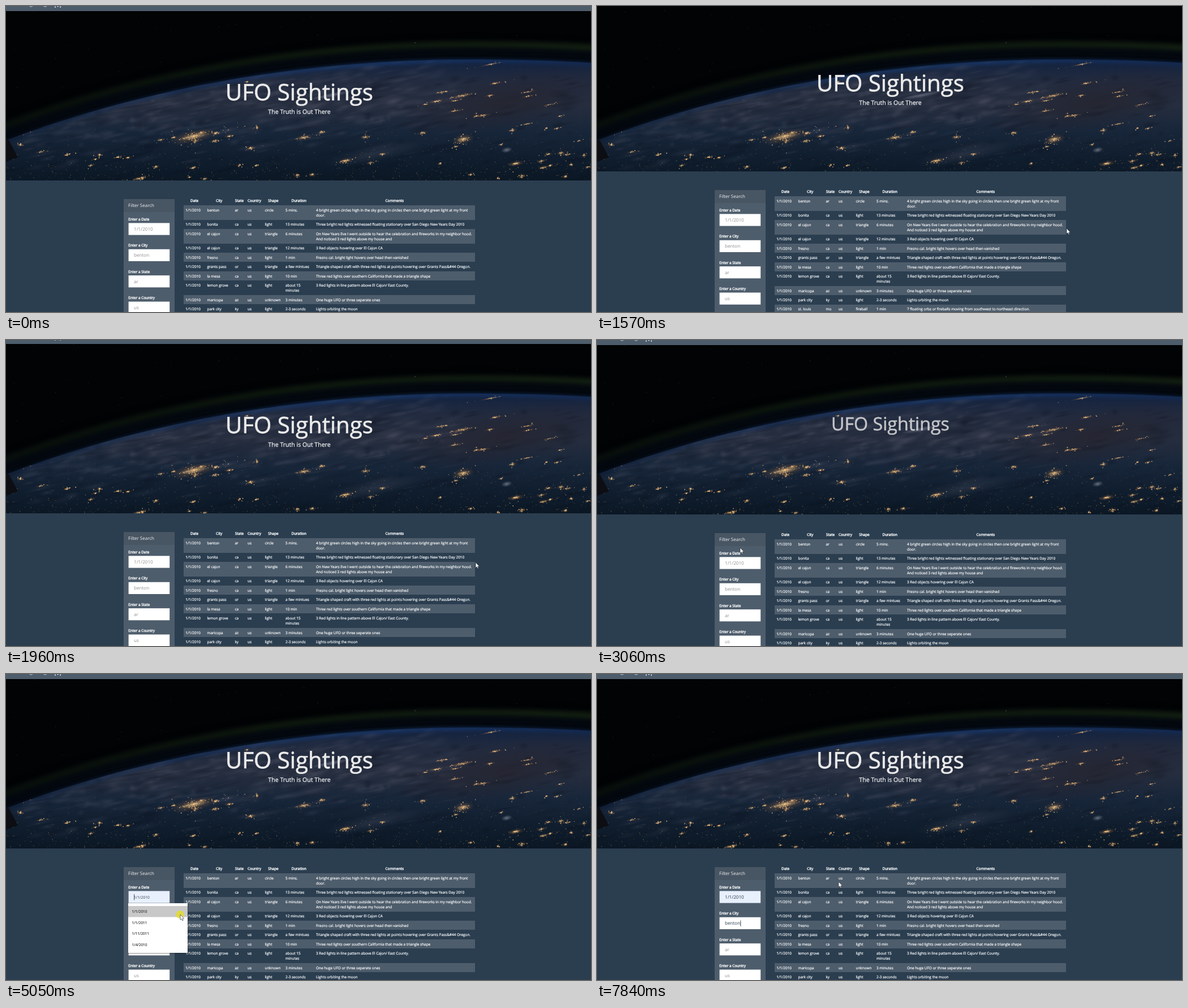
Recreate the animation shown at these times as an HTML page with a canvas. Size 1034 by 542 pixels, loop 8000 ms.

```html
<!DOCTYPE html>
<html lang="en">
<head>
<meta charset="utf-8">
<title>UFO Sightings</title>
<style>
  html, body { margin: 0; width: 100%; height: 100%; overflow: hidden; background: #2b3e50; }
  canvas, svg { position: absolute; left: 0; top: 0; display: block; }
  text {
    font-family: "Open Sans", "Noto Sans", sans-serif;
    font-size: 6.41px; fill: #f1f3f4; white-space: pre;
    text-rendering: geometricPrecision;
  }
  .cell { stroke: #f1f3f4; stroke-width: .24px; }
  .bold { stroke: #f1f3f4; stroke-width: .42px; }
  .field { font-size: 8.1px; fill: #8f8f8f; }
  .item { fill: #222; stroke: #222; stroke-width: .12px; }
  .brand { font-size: 10.5px; }
  .heading { font-size: 8px; }
  .title { font-size: 40.2px; fill: #ebebeb; stroke: #ebebeb; stroke-width: .7px; }
  .subtitle { font-size: 10.6px; stroke: #f1f3f4; stroke-width: .25px; }
</style>
</head>
<body>
<canvas id="photo" width="1034" height="542"></canvas>
<svg id="stage" width="1034" height="542" viewBox="0 0 1034 542"></svg>
<script>
const LOOP = 8000;

// ---------- night view of the planet, drawn once ----------
function paintPhoto() {
  const c = document.getElementById('photo').getContext('2d');
  let seed = 11;
  const rnd = () => (seed = (seed * 16807) % 2147483647) / 2147483647;
  const range = (a, b) => a + rnd() * (b - a);
  const gauss = () => (rnd() + rnd() + rnd() - 1.5) * 1.4;
  const repeat = (n, draw) => { for (let i = 0; i < n; i++) draw(i); };

  const gradient = (x, y, colors) => {
    const g = c.createLinearGradient(0, y ? 90 : 0, x, y);
    colors.forEach((col, i) => g.addColorStop(i / (colors.length - 1), col));
    return g;
  };
  const limb = dy => {
    c.beginPath();
    c.moveTo(-20, 246 + dy);
    c.bezierCurveTo(250, 140 + dy, 550, 92 + dy, 850, 95 + dy);
    c.bezierCurveTo(920, 95.5 + dy, 980, 97 + dy, 1054, 102 + dy);
  };
  const glow = (dy, width, blur, style) => {
    c.filter = `blur(${blur}px)`;
    c.lineWidth = width;
    c.strokeStyle = style;
    limb(dy);
    c.stroke();
    c.filter = 'none';
  };
  const dot = (x, y, r, fill) => {
    c.fillStyle = fill;
    c.beginPath();
    c.arc(x, y, r, 0, 7);
    c.fill();
  };
  const blob = (x, y, rx, ry, rgb, a) => {
    c.save();
    c.translate(x, y);
    c.rotate(-0.2);
    c.scale(rx, ry);
    const g = c.createRadialGradient(0, 0, 0, 0, 0, 1);
    g.addColorStop(0, `rgba(${rgb},${a})`);
    g.addColorStop(1, `rgba(${rgb},0)`);
    dot(0, 0, 1, g);
    c.restore();
  };
  // dense in the middle, thinning out along a slight slope
  const city = (x, y, w, h) => {
    blob(x, y, w * 1.2, h * 1.3, '205,130,62', 0.35);
    blob(x, y, w * 0.7, h * 0.6, '255,215,150', 0.6);
    repeat(8 + w * h * 0.3, () => {
      const dx = gauss() * Math.abs(gauss()) * w * 1.4;
      const dy = gauss() * Math.abs(gauss()) * h * 1.4;
      dot(x + dx, y + dy - dx * 0.18, range(0.4, 1), `rgba(255,205,140,${range(0.35, 0.9)})`);
    });
  };

  c.fillStyle = '#020304';
  c.fillRect(0, 0, 1034, 542);
  repeat(90, () => dot(range(0, 1034), range(0, 200), 0.45, `rgba(200,210,225,${range(0.1, 0.5)})`));
  dot(723, 65, 0.8, '#b9c2cc');
  glow(-14, 26, 9, '#040911');
  glow(-27, 8, 4, gradient(1034, 0, ['#0a130b', '#121f0f', '#182713']));

  c.save();
  limb(0);
  c.lineTo(1054, 542);
  c.lineTo(-20, 542);
  c.clip();
  c.fillStyle = gradient(0, 309, ['#11213f', '#222b3f', '#252d3e', '#18263a', '#101e2f', '#0b1724']);
  c.fillRect(0, 0, 1034, 542);

  repeat(480, () => {
    const x = range(20, 800);
    blob(x, 205 - x * 0.06 + gauss() * 52, range(6, 34), range(2, 8), '116,114,130', range(0.05, 0.16));
  });
  repeat(220, () => blob(range(0, 1034), range(125, 309), range(6, 38), range(2, 8), '9,15,27', range(0.12, 0.32)));
  blob(880, 170, 190, 50, '38,31,38', 0.5);
  blob(650, 262, 90, 14, '110,112,128', 0.22);
  blob(575, 158, 40, 4, '185,190,205', 0.35);
  blob(885, 255, 10, 5, '180,185,195', 0.5);

  repeat(1100, () => {
    const depth = Math.sqrt(rnd());
    dot(range(0, 1034), 170 + depth * 139, range(0.3, 0.8), `rgba(235,178,112,${range(0.1, 0.6) * depth})`);
  });
  repeat(55, () => {
    const y = range(215, 307);
    city(range(0, 1034), y, range(3, 9), range(1.2, 3.5));
  });
  repeat(14, () => city(range(700, 1034), range(135, 215), range(6, 14), range(1, 2)));
  [[332, 231, 36, 9], [808, 236, 17, 7], [526, 233, 14, 4], [601, 274, 11, 4], [901, 279, 13, 4], [858, 103, 20, 1.5], [806, 159, 18, 3], [426, 134, 4, 2]]
    .forEach(place => city(...place));
  c.restore();

  glow(2, 4, 3, gradient(1034, 0, ['#0a1a34', '#15356a', '#19407c', '#122e5e']));
  c.fillStyle = '#0c0e13';
  c.beginPath();
  [[0, 236], [5, 238], [21, 268], [0, 276]].forEach(([x, y]) => c.lineTo(x, y));
  c.fill();
}

// ---------- page ----------
const rect = (x, y, w, h, fill, extra = '') =>
  `<rect x="${x}" y="${y}" width="${w}" height="${h}" fill="${fill}" ${extra}/>`;
const text = (x, y, str, cls = '', extra = '') =>
  `<text x="${x}" y="${y}" class="${cls}" ${extra}>${str.replace(/&/g, '&amp;')}</text>`;
const MIDDLE = 'text-anchor="middle"';

const HEADERS = ['Date', 'City', 'State', 'Country', 'Shape', 'Duration', 'Comments'];
const EDGES = [314, 352.2, 401.2, 423.7, 454.2, 490.7, 544.7, 829];
// city, state, shape, duration, comment; "|" breaks a line
const SIGHTINGS = [
  ['benton', 'ar', 'circle', '5 mins.', '4 bright green circles high in the sky going in circles then one bright green light at my front|door.'],
  ['bonita', 'ca', 'light', '13 minutes', 'Three bright red lights witnessed floating stationary over San Diego New Years Day 2010'],
  ['el cajon', 'ca', 'triangle', '6 minutes', 'On New Years Eve I went outside to hear the celebration and fireworks in my neighbor hood.|And noticed 3 red lights above my house and'],
  ['el cajon', 'ca', 'triangle', '12 minutes', '3 Red objects hovering over El Cajon CA'],
  ['fresno', 'ca', 'light', '1 min', 'Fresno cal. bright light hovers over head then vanished'],
  ['grants pass', 'or', 'triangle', 'a few mintues', 'Triangle shaped craft with three red lights at points hovering over Grants Pass&#44 Oregon.'],
  ['la mesa', 'ca', 'light', '10 min', 'Three red lights over southern California that made a triangle shape'],
  ['lemon grove', 'ca', 'light', 'about 15|minutes', '3 Red lights in line pattern above El Cajon/ East County.'],
  ['maricopa', 'az', 'unknown', '3 minutes', 'One huge UFO or three seperate ones'],
  ['park city', 'ky', 'light', '2-3 seconds', 'Lights orbiting the moon'],
  ['st. louis', 'mo', 'fireball', '1 min', '7 floating orbs or fireballs moving from southwest to northeast direction.'],
  ['el cajon', 'ca', 'formation', '15 min.', 'Three red lights over the San Diego area - IT&#39S A HOAX YET AGAIN&#33&#33'],
  ['spring valley', 'ca', 'light', '10:00', 'Three bright red lights in a straight line formation']
];
const FILTERS = [['Date', '1/1/2010'], ['City', 'benton'], ['State', 'ar'], ['Country', 'us'], ['Shape', 'circle']];

function table() {
  let out = HEADERS.map((name, k) => text((EDGES[k] + EDGES[k + 1]) / 2, 346.8, name, 'bold', MIDDLE)).join('');
  let y = 353;
  SIGHTINGS.forEach(([city, state, shape, duration, comment], i) => {
    const cells = ['1/1/2010', city, state, 'us', shape, duration, comment];
    const h = cells.some(s => s.includes('|')) ? 25.6 : 16.4;
    const top = Math.round(y);
    if (i % 2 === 0) out += rect(314, top, 515, Math.round(y + h) - top, '#4e5d6c');
    cells.forEach((cell, k) => cell.split('|').forEach((line, n) => {
      out += text(EDGES[k] + 3.3, y + 10.7 + n * 9.2, line, 'cell');
    }));
    y += h;
  });
  return out;
}

function filterPanel() {
  return rect(208, 342, 90, 300, '#4e5d6c') + rect(208, 342, 90, 23, '#485563') +
    text(216, 356, 'Filter Search', 'heading') +
    FILTERS.map(([name, hint], i) => {
      const y = 46.4 * i;
      return text(216.3, 379.7 + y, 'Enter a ' + name, 'bold') +
        rect(216.6, 384.4 + y, 72.6, 21.2, '#fff', `id="box${i}"`) +
        text(226, 398 + y, hint, 'field', `id="field${i}"`);
    }).join('');
}

function menu(id, top, items) {
  const h = items.length * 19.6 + 9.5;
  return `<g id="${id}">` + rect(216, top + 1, 106, h + 1, '#000', 'opacity=".25"') +
    rect(216, top, 105, h, '#fff') +
    rect(216, top + 5, 105, 19.5, '#c8c8c8', `id="${id}Hover" visibility="hidden"`) +
    items.map((s, i) => text(222.7, top + 17 + i * 19.6, s, 'item')).join('') + '</g>';
}

paintPhoto();
document.getElementById('stage').innerHTML =
  '<g id="page">' +
  rect(0, -60, 1034, 69, '#4e5d6c') +
  text(9, -0.9, 'UFO Sightings', 'brand') +
  [-1, 0, 1].map(k => `<circle cx="${91.6 + k * 4.6}" cy="${0.6 + 1.2 * k * k}" r="1" fill="#fff"/>`).join('') +
  rect(0, 309, 1034, 400, '#2b3e50') +
  `<g id="title">${text(518.5, 167, 'UFO Sightings', 'title', MIDDLE)}</g>` +
  text(518.5, 191.4, 'The Truth is Out There', 'subtitle', MIDDLE + ' id="subtitle"') +
  filterPanel() + table() +
  rect(226, 390, 0.8, 10.5, '#222', 'id="caret"') +
  menu('dates', 406, ['1/1/2010', '1/1/2011', '1/11/2011', '1/4/2010']) +
  menu('cities', 452, ['benton', 'el cajon', 'fresno']) +
  menu('match', 452, ['benton']) +
  '</g>' +
  '<circle id="click" r="7" fill="#e3dc2c" opacity=".85"/>' +
  '<path id="cursor" d="M0 0V9.6L2.2 7.6L3.7 11L5.2 10.3L3.8 7.1H6.7Z" fill="#fff" stroke="#1c2430" stroke-width=".6"/>';

const el = {};
document.querySelectorAll('[id]').forEach(node => { el[node.id] = node; });

// ---------- motion ----------
// start, end, x, y of each pointer move
const MOVES = [
  [300, 860, 912, 441], [940, 1400, 830, 394], [2150, 2980, 253, 368], [3060, 3380, 249, 387],
  [4500, 4680, 348, 368], [4680, 4900, 308, 426], [5780, 6020, 283, 439], [6200, 6510, 427, 368]
];
const CLICKS = [3520, 5010, 6060];
const KEYS = [6670, 6900, 7450, 7600, 7770, 7840];

const between = (t, a, b) => t >= a && t < b;
const progress = (t, a, b) => Math.max(0, Math.min(1, (t - a) / (b - a)));
const easeOut = p => Math.sin(p * Math.PI / 2);
const smooth = p => p * p * (3 - 2 * p);
const show = (node, on) => node.setAttribute('visibility', on ? 'visible' : 'hidden');

const scrollAt = t => 53 * easeOut(progress(t, 1514, 1800)) * (1 - progress(t, 1850, 2016)) ** 3;

const pointerAt = t => MOVES.reduce(([x, y], [a, b, toX, toY]) => {
  const p = smooth(progress(t, a, b));
  return [x + (toX - x) * p, y + (toY - y) * p];
}, [1040, 555]);

function setField(i, value, color, size, box) {
  const f = el['field' + i];
  if (f.textContent !== value) f.textContent = value;
  f.style.fill = color;
  f.style.fontSize = size + 'px';
  el['box' + i].setAttribute('fill', box);
}

function render(t) {
  el.page.setAttribute('transform', `translate(0 ${-Math.round(scrollAt(t))})`);

  const grow = t < 2600 ? 1 : easeOut(progress(t, 2600, 3380));
  el.title.setAttribute('transform', `translate(518.5 130) scale(${grow}) translate(-518.5 -130)`);
  el.title.setAttribute('opacity', grow);
  el.subtitle.setAttribute('opacity', t < 2600 ? 1 : progress(t, 3500, 4400));

  const [x, y] = pointerAt(t);
  el.cursor.setAttribute('transform', `translate(${x} ${y})`);
  el.click.setAttribute('transform', `translate(${x - 0.5} ${y})`);
  show(el.click, CLICKS.some(c => between(t, c, c + 160)));

  const hover = between(t, 4800, 5170);
  const picked = t >= 5170;
  const filled = hover || picked;
  setField(0, '1/1/2010', filled ? '#2b3540' : '#8f8f8f', hover ? 6.7 : 8.1, filled ? '#e8f0fe' : '#fff');
  show(el.dates, between(t, 3600, 5170));
  show(el.datesHover, hover);

  const typed = KEYS.filter(k => t >= k).length;
  setField(1, typed ? 'benton'.slice(0, typed) : 'benton', typed ? '#2b3e50' : '#8f8f8f', 8.1, '#fff');
  show(el.cities, between(t, 6100, 6670));
  show(el.match, between(t, 6670, 7840));

  const inCity = t >= 6100;
  let offset = 0.3;
  if (typed) offset += el.field1.getComputedTextLength();
  else if (picked && !inCity) offset += el.field0.getComputedTextLength();
  el.caret.setAttribute('x', 226 + offset);
  el.caret.setAttribute('y', inCity ? 436.5 : 390);
  show(el.caret, between(t, 3600, 4090) || between(t, 4600, 5670) || inCity);
}

function frame(now) {
  render(now % LOOP);
  requestAnimationFrame(frame);
}
render(0);
requestAnimationFrame(frame);
</script>
</body>
</html>
```
